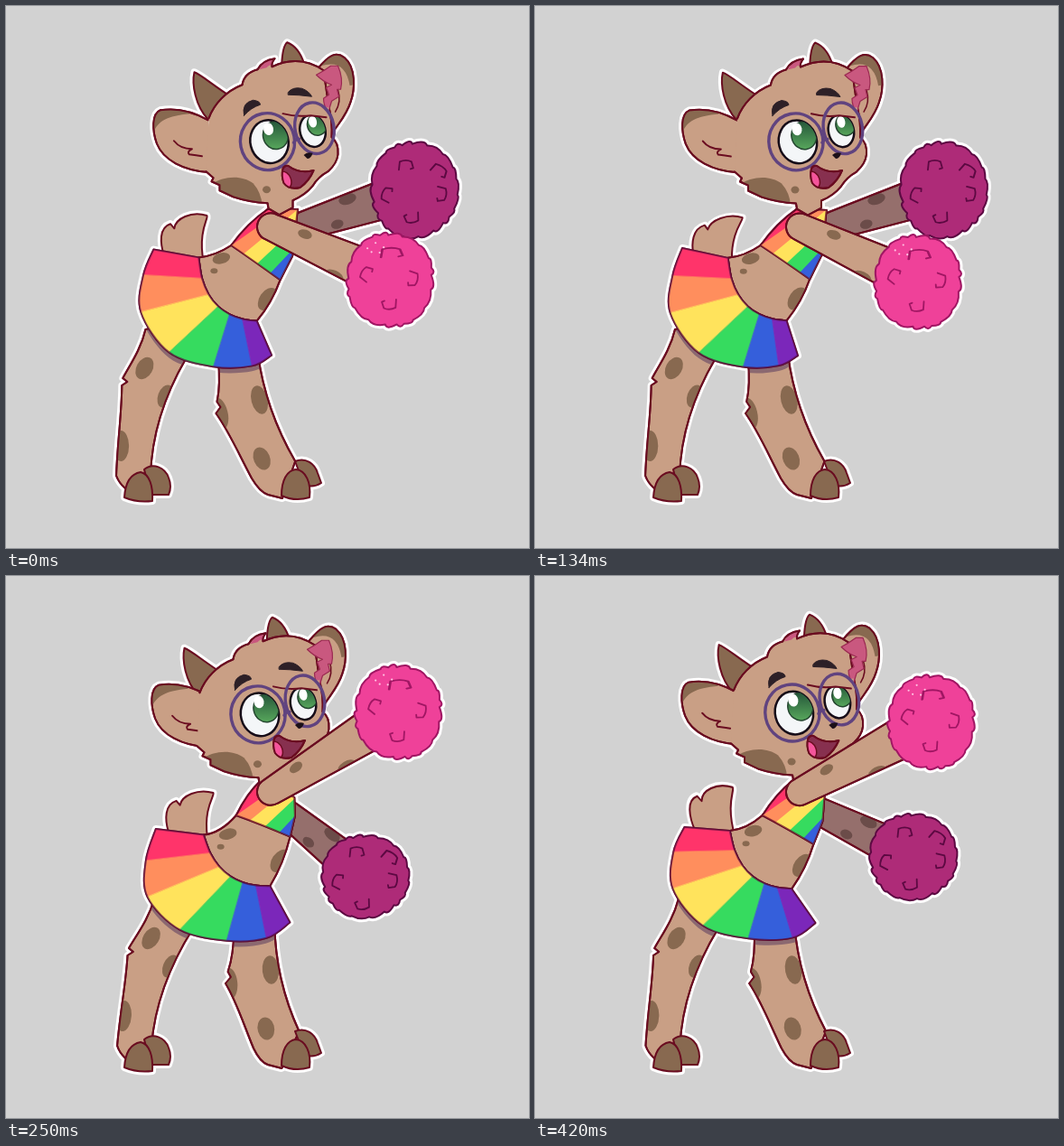
An HTML page with a canvas for the animation above (0.5 s loop, 579 by 600 pixels).

```html
<!DOCTYPE html>
<html lang="en">
<head>
<meta charset="utf-8">
<title>Cheering fawn</title>
<style>
html, body { margin: 0; height: 100%; overflow: hidden; background: #d2d2d2; }
canvas { display: block; }
</style>
</head>
<body>
<canvas id="stage" width="579" height="600"></canvas>
<script>
const ctx = document.getElementById('stage').getContext('2d');
const INK = '#6a0c20', SKIN = '#c99f85', SPOT = '#886950', PINK = '#c9587f', BROW = '#2d2027';
const RAINBOW = ['#ff346a', '#ff8e5d', '#ffe35c', '#36db5f', '#355fdb', '#7b27ba'];
const ENDS = [80, 170, 250, 340, 420, 500];
// Arm angles in degrees, one per held pose
const FRONT = [24, 25, -12, -32, -32, -28];
const BACK = [-18, -18, -3, 39, 41, 26];

let halo = false, step = 0, sway = 0, swing = 0;

// Rises from 0 to 1 and back once per loop, delayed by some steps
const wave = lag => .5 - .5 * Math.cos((step - lag) * Math.PI / 3);
const move = (k, [x, y, dx, dy]) => [x + dx * k, y + dy * k];
const between = (a, b, t) => a.map((v, n) => v + (b[n] - v) * t);

function shape(path, fill, line = INK, width = 2) {
  if (!(path instanceof Path2D)) path = new Path2D(path);
  ctx.lineJoin = ctx.lineCap = 'round';
  ctx.lineWidth = halo ? 8 : width;
  ctx.strokeStyle = halo ? '#fff' : line;
  if (!halo) {
    ctx.fillStyle = fill;
    ctx.fill(path);
  }
  ctx.stroke(path);
}

function detail(path, fill, line, width) {
  if (!halo) shape(path, fill || 'transparent', line || 'transparent', width);
}

function moved(matrix, draw) {
  ctx.save();
  ctx.transform(...matrix);
  draw();
  ctx.restore();
}

const at = (x, y, draw) => moved([1, 0, 0, 1, x, y], draw);
const drift = (dx, dy, draw) => at(dx * sway, dy * sway, draw);

function inside(path, draw) {
  if (halo) return;
  ctx.save();
  ctx.clip(path instanceof Path2D ? path : new Path2D(path));
  draw();
  ctx.restore();
}

// Filled and outlined, with markings clipped to it
function marked(path, fill, draw) {
  shape(path, fill);
  inside(path, draw);
  detail(path, null, INK);
}

function oval(x, y, rx, ry, turn = 0) {
  const p = new Path2D();
  p.ellipse(x, y, rx, ry, turn, 0, 7);
  return p;
}

const spot = (x, y, rx, ry, turn, color = SPOT) => detail(oval(x, y, rx, ry, turn), color);

// Smooth curve commands through the points
function curve(pts) {
  let d = '';
  for (let i = 0; i < pts.length - 1; i++) {
    const a = pts[i - 1] || pts[i], b = pts[i], c = pts[i + 1], e = pts[i + 2] || c;
    d += `C${b[0] + (c[0] - a[0]) / 6} ${b[1] + (c[1] - a[1]) / 6} ` +
         `${c[0] - (e[0] - b[0]) / 6} ${c[1] - (e[1] - b[1]) / 6} ${c}`;
  }
  return d;
}

function pom(rx, ry, fill, line, curls, seed) {
  const n = 21, p = new Path2D();
  const rand = k => Math.sin((k % n + 1) * seed) * .5;
  const rim = (k, r) => [Math.cos(k / n * 2 * Math.PI) * rx * r, Math.sin(k / n * 2 * Math.PI) * ry * r];
  const notch = k => rim(k + rand(k) * .8, .96 + rand(k) * .05);
  p.moveTo(...notch(0));
  for (let k = 0; k < n; k++) p.quadraticCurveTo(...rim(k + .5, 1.05), ...notch(k + 1));
  p.closePath();
  shape(p, fill, line);
  for (const [x, y, turn, size] of curls) at(x, y, () => {
    ctx.rotate(turn);
    ctx.scale(size, 1);
    detail('M-8 5L-7 -4Q0 -7 6 -4L8 3L5 4', null, line, 1.8);
  });
}

// Arm from the shoulder to the middle of its pom
function arm(x, y, degrees, len, fill, markings, drawPom) {
  const turn = degrees * Math.PI / 180, half = 15 + len * .06;
  const p = new Path2D();
  p.moveTo(len, -half);
  p.lineTo(0, -15);
  p.arc(0, 0, 15, -Math.PI / 2, Math.PI / 2, true);
  p.lineTo(len, half);
  at(x, y, () => {
    ctx.rotate(turn);
    marked(p, fill, markings);
  });
  at(x + Math.cos(turn) * len, y + Math.sin(turn) * len, drawPom);
}

function backArm() {
  const a = BACK[step], len = 129 - .53 * a;
  arm(318 - .12 * a, 252 + .32 * a, a, len, '#956f6c', () => {
    spot(len * .47, -13, 10, 6, 0, '#6b4c49');
    spot(len * .33, 10, 7, 5, 0, '#6b4c49');
  }, () => pom(49, 52 - .13 * a, '#ae2b78', '#5c0942',
    [[-9, -27, 0, 1], [28, -21, .6, 1.1], [-30, 5, -1.2, 1], [30, 5, 1.7, 1], [-3, 31, 3, 1]], 7.3));
}

function frontArm() {
  const a = FRONT[step];
  arm(293, 242 + .1 * a, a, 154 - .39 * a, SKIN, () => {
    spot(38, -8, 8, 5, -.1);
    spot(86, 21, 11, 6, 0);
  }, () => {
    pom(49, 53, '#ef4199', '#a01663',
      [[2, -30, 0, 1.5], [-26, -7, -1, 1], [25, -1, 1.8, 1], [-1, 27, 3.1, 1]], 5.1);
    for (let k = 0; k < 5; k++)
      detail(oval(-25 + k * 4.5, -35 + 6 * Math.sin(k * 2.4), 1.1, 1.1), '#ffc4e2');
  });
}

// The foot stays put while the hip leans by `lean` per pixel of height
function leg(lean, path, skirt, draw) {
  moved([1, 0, -lean, 1, 540 * lean, 0], () => marked(path, SKIN, () => {
    draw();
    moved([1, 0, lean, 1, -540 * lean, 6], () => detail(skirt, '#8b6870'));
  }));
}

function legs(skirt) {
  leg(.057 * sway, 'M154 358C149 380 137 397 129 412L134 416L128 420C128 450 123 485 122 520Q125 528 132 534L160 520C161 480 173 435 199 390L198 350Z', skirt, () => {
    spot(153, 401, 9, 13, .5);
    spot(176, 432, 8, 13, .35);
    spot(127, 487, 9, 17, 0);
  });
  shape('M153 513C163 505 176 511 180 522Q184 532 180 541L160 541Z', SPOT);
  shape('M131 544C132 529 137 518 149 516C159 518 163 532 162 548Q145 550 131 544Z', SPOT);
  leg(.13 * sway, 'M234 390Q237 420 233 438L237 444L232 451C246 470 258 497 272 523Q281 538 290 541L306 545L320 504C303 475 285 435 278 385L250 370Z', skirt, () => {
    spot(280, 436, 9, 16, -.25);
    spot(283, 501, 9, 13, -.4);
    spot(236, 451, 9, 18, -.25);
  });
  shape('M320 504C332 499 342 507 345 517L349 528Q340 534 330 530Z', SPOT);
  shape('M305 542C305 525 311 514 321 513C332 514 338 528 336 544Q320 549 305 542Z', SPOT);
}

function tail() {
  const bx = 5 * sway, by = 10 * swing;
  const kx = (14 * wave(-1) - 6 - bx) / 43, ky = (8 * wave(0) - by) / 43;
  moved([1, 0, -kx, 1 - ky, bx + 276 * kx, by + 276 * ky], () =>
    shape('M175 276C171 262 171 245 184 241L188 246C190 235 208 227 225 232C227 235 214 248 218 282', SKIN));
}

function makeSkirt() {
  const start = move(sway, [213, 278, 6, 9]), bend = move(sway, [217, 345, 18, 0]);
  const end = move(sway, [277, 349, 16, -6]);
  const waist = RAINBOW.concat(0).map((_, k) => {
    const t = k / 6 + .05 * Math.sin(k * Math.PI / 6);
    return between(between(start, bend, t), between(bend, end, t), t);
  });
  const hem = [
    move(swing, [163, 268, 4, 17]),
    ...[[152, 297, 3, 19], [149, 338, 8, 18], [180, 383, 13, 9], [229, 399, 16, 5]].map(p => move(sway, p)),
    move(swing, [270, 398, 26, 4]),
    move(swing, [291, 387, 33, -5])
  ];
  const path = `M${start}${curve(waist)}L${hem[6]}${curve([...hem].reverse())}Z`;
  return { waist, hem, path };
}

function torso({ waist }, top) {
  const [strap, left, right, side] = top, back = waist[0], front = waist[6];
  const path = `M${strap}L${left}Q${left[0] - 17} ${back[1] - 2} ${back}${curve(waist)}` +
    `Q${(front[0] + right[0]) / 2 + 4} ${(front[1] + right[1]) / 2 + 2} ${right}L${side}L${top[4]}Z`;
  marked(path, SKIN, () => {
    drift(8, 7, () => {
      spot(238, 279, 10, 6, -.25);
      spot(230, 293, 4, 3, 0);
    });
    drift(15, -10, () => spot(289, 325, 9, 14, .6));
  });
}

function drawSkirt({ waist, hem, path }) {
  shape(path, RAINBOW[0]);
  inside(path, () => RAINBOW.forEach((color, k) => {
    const edge = (j, t) => between(waist[j], hem[j], t);
    detail(`M${edge(k, -.1)}L${edge(k + 1, -.1)}L${edge(k + 1, 1.25)}L${edge(k, 1.25)}Z`, color, color, .6);
  }));
  detail(path, null, 'rgba(85,10,60,.65)');
}

function drawTop([strap, left, right, side, shoulder]) {
  const [mx, my] = between(left, right, .5), [sx, sy] = between(strap, left, .5);
  const path = `M${strap}Q${sx - 2} ${sy - 5} ${left}Q${mx - 2} ${my - 2} ${right}L${side}L${shoulder}Z`;
  shape(path, RAINBOW[0]);
  inside(path, () => [0, .25, .53, .8].forEach((t, k) => {
    const [x, y] = between(left, right, t), slope = .7 + k * .12;
    detail(`M${x - 20} ${y + 20 * slope}L${x + 100} ${y - 100 * slope}V400H${x - 20}Z`, RAINBOW[k + 1]);
  }));
  detail(path, null, 'rgba(100,10,40,.7)');
}

function eye(x, y, rx, ry, iris, shine) {
  const ball = oval(x, y, rx, ry, -.25);
  detail(ball, '#f4f6f8', '#160c18', 2.5);
  inside(ball, () => {
    const [ix, iy, r] = iris;
    const green = ctx.createLinearGradient(0, iy - r, 0, iy + r);
    green.addColorStop(0, '#285b3c');
    green.addColorStop(1, '#55a35a');
    detail(oval(ix, iy, r, r * 1.1, -.2), green, '#24452f', 1.5);
    detail(oval(...shine, -.2), '#fff');
  });
}

function face() {
  drift(-11.5, 3.5, () => {
    const frame = p => detail(p, null, '#60437f', 3.4);
    eye(292, 150, 21, 24, [299, 143, 14], [291, 136, 5.5, 7]);
    eye(340, 138, 14, 18, [345, 131, 11], [340, 128, 4.5, 6.5]);
    detail('M322 116L358 112L357 123Q343 120 326 123Z', SKIN);
    detail('M307 119Q322 123 338 121L355 123', null, INK);
    frame(oval(290, 150, 30, 31.5, -.2));
    frame(oval(342, 135, 21.5, 28.5, -.2));
    frame('M319 151Q321 147 325 147');
  });
  drift(-10.5, 0, () => {
    detail('M330 165Q334 161 340 163Q338 169 334 169Z', '#1c1018');
    marked('M307 180Q309 176 313 177Q325 186 341 182Q336 194 326 201Q314 204 308 196Q305 188 307 180Z', halo ? '' : '#87304f',
      () => detail(oval(309, 193, 7, 10, -.35), '#f4559b', INK, 1.5));
  });
}

function head() {
  drift(-12, 7, () => shape('M224 125C210 110 206 86 209 73C217 76 229 87 251 101L238 126Z', SPOT));
  drift(-18, 6, () => shape('M306 64Q307 44 312 40Q325 45 331 64Z', SPOT));
  drift(-2, 6, () => {
    marked('M224 126C208 117 190 112 171 115C161 119 162 138 167 152C174 170 196 182 226 184', SKIN,
      () => detail('M160 152C164 130 172 122 204 119L175 105L150 120Z', SPOT));
    detail('M186 149Q193 158 206 158Q200 161 203 164Q211 165 217 166', null, INK);
  });
  drift(-10, 2, () => {
    marked('M345 70C358 54 366 50 375 57C388 68 387 92 382 106C377 122 368 130 361 142L350 110', SKIN,
      () => detail('M350 66Q376 58 381 88L394 86L380 46L356 46Z', SPOT));
    detail('M368 93Q372 106 365 117', null, INK, 1.5);
  });
  drift(-11, 5.5, () => {
    marked('M225 124C231 108 244 94 262 87Q264 74 279 70Q284 60 298 58Q294 63 295 67' +
      'Q325 53 352 71L358 112Q362 128 361 145Q369 151 368 164Q367 174 357 183Q346 189 340 199' +
      'Q332 209 318 215L318 223L303 231L291 224L290 218Q270 217 252 211L237 204L237 198L228 194L230 190L222 183', SKIN, () => {
      detail('M226 198C242 187 262 187 274 196Q283 206 284 220L230 222Z', SPOT);
      spot(289, 203, 4.5, 4, 0);
      detail('M281 70Q285 60 300 56L295 67Q293 63 289 68Z', PINK);
    });
    detail('M344 76Q352 72 360 66L368 66Q374 80 371 92L367 92L369 100L361 105L357 118Q352 110 352 102L358 98L355 90L361 87Q352 84 344 76Z', PINK, '#9a2951', 1.2);
    detail('M264 121Q261 107 274 104Q282 105 282 109Q272 112 264 121Z', BROW, BROW, 1);
    detail('M313 95Q318 89 328 91Q336 94 339 100Q324 98 313 98Z', BROW, BROW, 1);
  });
  face();
}

function figure() {
  const skirt = makeSkirt();
  // Strap, left hem, right hem, side, far strap
  const top = [[290, 225, -8, 1], [249, 265, 6, 0], [303, 304, 12, -16], [317, 277, 3, -12], [323, 224, -4, 22]]
    .map(p => move(sway, p));
  tail();
  backArm();
  legs(skirt.path);
  torso(skirt, top);
  drawSkirt(skirt);
  drawTop(top);
  head();
  frontArm();
}

requestAnimationFrame(function loop(now) {
  step = ENDS.findIndex(end => now % 500 < end);
  sway = wave(.4);
  swing = wave(.9) ** 1.5;
  ctx.fillStyle = '#d2d2d2';
  ctx.fillRect(0, 0, 579, 600);
  for (halo of [true, false]) figure();
  requestAnimationFrame(loop);
});
</script>
</body>
</html>
```
